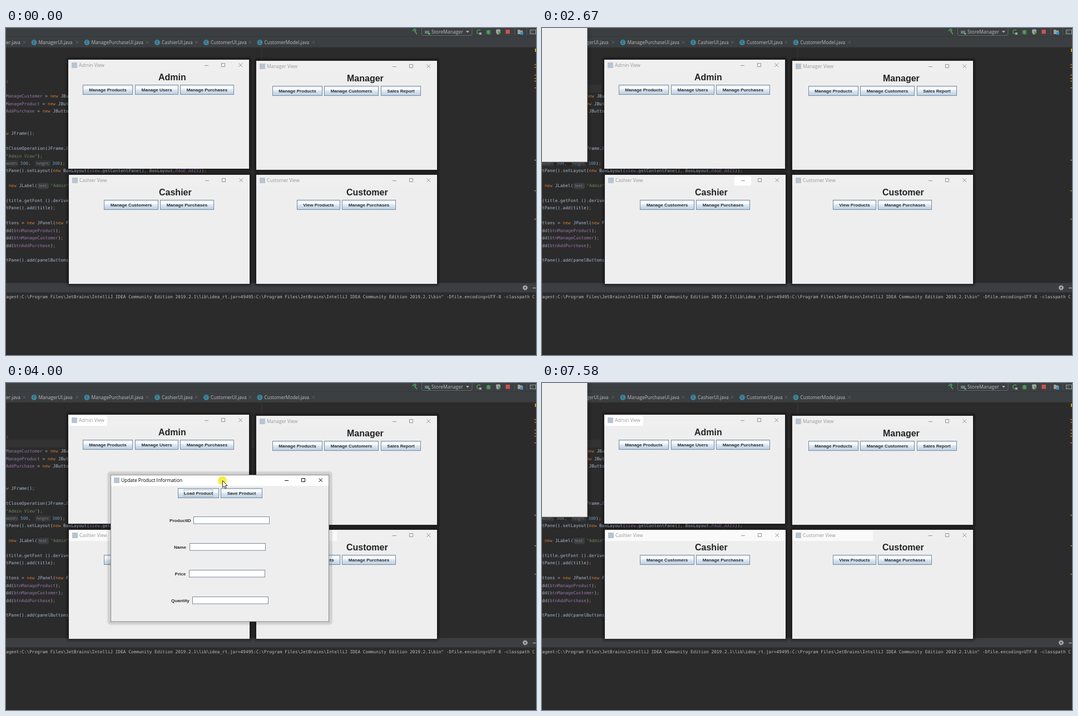
Animation, 953 px wide and 588 px high, one loop 8000 ms. Source, as an HTML page:

```html
<!DOCTYPE html>
<html lang="en">
<head>
<meta charset="utf-8">
<title>Store manager windows</title>
<style>
html, body { margin: 0; width: 100%; height: 100%; overflow: hidden; background: #2b2b2b; }
svg { display: block; width: 953px; height: 588px; }
text { white-space: pre; }
.ui { font: 8.4px "Open Sans", "Noto Sans", sans-serif; fill: #bbb; }
.code { font: 7.79px "DejaVu Sans Mono", monospace; fill: #a9b7c6; }
.hint { font: 7.4px "Open Sans", sans-serif; fill: #7e8285; }
.o { fill: #cc7832; } .p { fill: #9876aa; } .s { fill: #6a8759; } .n { fill: #6897bb; }
.i { fill: #9876aa; font-style: italic; }
.bold { font: bold 8.1px "Liberation Sans", Arial, sans-serif; fill: #2a2a2a; }
.head { font: bold 16px "Liberation Sans", Arial, sans-serif; fill: #222; }
.shadow { filter: blur(.8px); }
.title { font: 8.4px "Open Sans", "Noto Sans", sans-serif; fill: #979797; }
.ctl { fill: none; stroke: #929292; }
.active .title { fill: #000; }
.active .ctl { stroke: #000; }
.button rect { fill: url(#metal); stroke: #7a8a99; }
.button .focus, .button .glow { fill: none; stroke: none; }
.button.hover .glow { stroke: #a9c6e3; }
.button.pressed .face { fill: #b2cbe4; }
.button.focused .focus { stroke: #a3b8cc; }
.field { fill: #fff; stroke: #7a8a99; }
</style>
</head>
<body>
<svg id="stage" viewBox="0 0 953 588"></svg>
<script>
const LOOP = 8000;
const $ = id => document.getElementById(id);

const box = (x, y, w, h, fill, extra = '') =>
  `<rect x="${x}" y="${y}" width="${w}" height="${h}" fill="${fill}" ${extra}/>`;
const label = (x, y, cls, str, extra = '') =>
  `<text x="${x}" y="${y}" class="${cls}" ${extra}>${str}</text>`;
const line = (d, color, width = 1) =>
  `<path d="${d}" fill="none" stroke="${color}" stroke-width="${width}"/>`;
const patch = (id, x, y, w, h, fill) => box(x, y, w, h, fill, `id="${id}"`);

// Editor lines; {c:text} colours a span with class c.
const code = (row, str, x = 0) => label(x, 125.3 + row * 13.41, 'code',
  str.replace(/\{(\w):([^}]*)\}/g, '<tspan class="$1">$2</tspan>'));

const tab = (name, x, closeX) =>
  (x ? `<circle cx="${x - 8}" cy="26" r="4.9" fill="#3e86a0"/>` +
    label(x - 8, 28.4, 'ui', 'C', 'text-anchor="middle" style="font-size:6.5px;fill:#1f333c"') : '') +
  label(x, 29, 'ui', name) +
  line(`M${closeX - 2} 23.5l4 4m0-4l-4 4`, '#6e7072', .8);

const button = (x, y, w, str, id = '') => `
  <g class="button" id="${id}" transform="translate(${x + .5} ${y + .5})">
    <rect class="face" width="${w - 1}" height="17"/>
    <rect class="glow" x="1" y="1" width="${w - 3}" height="15"/>
    <rect class="focus" x="10.5" y="2.5" width="${w - 22}" height="12"/>
    ${label(w / 2 - .5, 11.8, 'bold', str, 'text-anchor="middle"')}
  </g>`;

const frame = (id, x, y, w, h, title, shade, pad, content, barFill = '#efefef') => `
  <g id="${id}" transform="translate(${x} ${y})">
    ${box(-pad, -pad, w + 2 * pad, h + 2 * pad, '#000', `rx="5" opacity="${shade}" class="shadow"`)}
    ${box(0, 0, w, h, '#eee')}
    ${box(0, 0, w, 20, barFill)}
    <g id="${id}Bar"></g>
    ${box(6, 5, 10, 10, '#b7c4d2')}
    ${label(19, 13.4, 'title', title)}
    <path class="ctl" d="M${w - 80} 10.5h7M${w - 49.5} 6.5h6v6h-6z"/>
    <path class="ctl" d="M${w - 18.5} 6.5l6.5 6.5m0-6.5l-6.5 6.5"/>
    ${content}
  </g>`;

const view = (id, x, y, name, headX, buttons) =>
  frame(id, x, y, 325, 196, name + ' View', .27, 4.5,
    label(headX, 37, 'head', name) +
    buttons.map(([bx, w, str, bid]) => button(bx, 45, w, str, bid)).join(''));

const input = (str, labelX, x, y) =>
  label(labelX, y + 10.3, 'bold', str) +
  box(x + .5, y + .5, 136, 12.5, '#fff', 'class="field"');

const toolbar = () =>
  box(0, 0, 953, 35, '#3c3f41') + box(0, 15, 953, 1, '#353739') + box(0, 34.5, 953, .8, '#323232') +
  line('M731 5l4-3 2 2-2 2 4 5', '#499c54', 2) +
  box(747.5, -3, 90.5, 16.5, '#3c3f41', 'stroke="#646668" rx="2"') +
  box(753, 3, 8, 7, '#6d7b83') + box(753, 3, 8, 2, '#40474c') +
  '<circle cx="761" cy="10.5" r="1.8" fill="#46c25b"/>' +
  label(765, 10, 'ui', 'StoreManager', 'style="font-size:8.6px"') +
  '<path d="M827 5h6l-3 4z" fill="#a5a7a9"/>' +
  line('M853 4.5a3.6 3.6 0 1 0 .6 4', '#499c54', 1.5) + box(851, 8, 4, 4, '#9da0a2') +
  '<ellipse cx="867.5" cy="7.5" rx="3" ry="4" fill="#499c54"/>' +
  line('M863 4l9 7M872 4l-9 7M863 7.5h9', '#499c54', .9) +
  '<path d="M881 3l4-1 4 1v4q-1 4-4 5-4-1-4-5z" fill="#9da0a2"/><path d="M885 5l5 3.5-5 3.5z" fill="#499c54"/>' +
  box(898.5, 3, 7.5, 7.5, '#c75450') +
  line('M914.5 1v12M936.5 1v12', '#515355') +
  '<path d="M920 3h4l1 1.5h4v6.5h-9z" fill="#9da0a2"/>' + box(925, 7, 5, 5, '#3592c4') +
  box(942.5, 3.5, 10, 7, '#3c3f41', 'stroke="#9da0a2"') + line('M944 5l3 2-3 2', '#499c54') +
  tab('er.java', 0, 33) + tab('ManagerUI.java', 58.5, 128) + tab('ManagePurchaseUI.java', 153.5, 254) +
  tab('CashierUI.java', 280, 342) + tab('CustomerUI.java', 368, 439) + tab('CustomerModel.java', 464.5, 553);

const editor = () =>
  box(459.5, 35, 1, 424, '#3a3a3a') +
  patch('caretA', 0, 102, 107, 14, '#323232') + patch('caretB', 441, 102, 5, 14, '#323232') +
  code(-2, '{o:;}') +
  code(0, '{p:ManageCustomer} = {o:new} JButton') +
  code(1, '{p:ManageProduct} = {o:new} JButton') +
  code(2, '{p:AddPurchase} = {o:new} JButton') +
  code(5, '{o:w} JFrame(){o:;}') +
  code(7, 'tCloseOperation(JFrame.{i:EXIT}') +
  code(8, '{s:"Admin View"}){o:;}') +
  box(-3, 238, 25, 11, '#343536', 'rx="2"') + box(52, 238, 28, 11, '#343536', 'rx="2"') +
  label(0, 245.8, 'hint', 'width:') + label(54.5, 245.8, 'hint', 'height:') +
  code(9, '{n:500}{o:,}', 26) + code(9, '{n:300}){o:;}', 83) +
  code(10, 'tPane().setLayout({o:new} BoxLayout({p:view}.getContentPane(){o:,} BoxLayout.{i:PAGE_AXIS})){o:;}') +
  code(12, ' {o:new} JLabel(') +
  box(57, 278.5, 20, 11, '#3b3d3e', 'rx="2"') + label(59, 286, 'hint', 'text:') +
  code(12, '{s:"Admin"}', 80) +
  code(14, '(title.getFont ().deriveFont') +
  code(15, 'tPane().add(title){o:;}') +
  code(17, 'ttons = {o:new} JPanel({o:new} Flow') +
  code(18, 'dd({p:btnManageProduct}){o:;}') +
  code(19, 'dd({p:btnManageCustomer}){o:;}') +
  code(20, 'dd({p:btnAddPurchase}){o:;}') +
  code(22, 'tPane().add(panelButtons') +
  box(951, 37, 2, 6, '#c9a022') +
  [65, 70, 84, 90, 95, 107, 237, 292, 343].map(y => box(950, y, 3, 1.3, '#b8912a')).join('');

const terminal = () =>
  box(0, 458.5, 953, 17, '#3c3f41') + box(0, 475, 953, .8, '#323232') +
  '<circle cx="933.5" cy="467" r="2.6" fill="none" stroke="#afb1b3" stroke-width="2"/>' +
  '<circle cx="933.5" cy="467" r="4" fill="none" stroke="#afb1b3" stroke-width="1.3" stroke-dasharray="1.6 1.54"/>' +
  line('M947 467.5h6', '#afb1b3', 1.2) +
  label(0, 486, 'code', 'agent:' + [
    'lib\\idea_rt.jar=49495:', 'bin" -Dfile.encoding=UTF-8 -classpath C'
  ].map(tail => 'C:\\Program Files\\JetBrains\\IntelliJ IDEA Community Edition 2019.2.1\\' + tail).join(''),
  'style="fill:#bbb"');

$('stage').innerHTML = `
  <defs><linearGradient id="metal" x2="0" y2="1">
    <stop stop-color="#dde8f3"/><stop offset=".3" stop-color="#fff"/>
    <stop offset=".5" stop-color="#dde8f3"/><stop offset="1" stop-color="#b8cfe5"/>
  </linearGradient></defs>
  ${box(0, 0, 953, 588, '#2b2b2b')}
  ${toolbar()}${editor()}${terminal()}
  ${view('manager', 450, 59, 'Manager', 163,
    [[29, 90, 'Manage Products'], [122, 98, 'Manage Customers'], [224, 72, 'Sales Report']])}
  ${view('customer', 450, 264, 'Customer', 162,
    [[73, 78, 'View Products'], [154, 97, 'Manage Purchases']])}
  ${view('cashier', 113, 264, 'Cashier', 162,
    [[63, 98, 'Manage Customers'], [164, 97, 'Manage Purchases']])}
  ${view('admin', 112, 57, 'Admin', 162,
    [[26, 90, 'Manage Products', 'products'], [120, 78, 'Manage Users', 'users'], [201, 97, 'Manage Purchases']])}
  ${frame('form', 0, 0, 393, 264, 'Update Product Information', .13, 5.5,
    `<g id="closeHot">${box(363, .5, 30, 20, '#e81123')}${line('M374.5 6.5l6.5 6.5m0-6.5l-6.5 6.5', '#fff')}</g>` +
    button(121, 24, 74, 'Load Product', 'load') + button(198, 24, 75, 'Save Product') +
    input('ProductID', 106, 149, 75) + input('Name', 114, 142, 123) +
    input('Price', 115.5, 141, 171) + input('Quantity', 109, 147, 219) +
    box(.5, .5, 392, 263.5, 'none', 'stroke="#6f6f6f" stroke-width=".8"'), '#fff')}
  <g id="cursor">
    <circle id="halo" r="8" fill="#f5ea2c" opacity=".85"/>
    <path d="M.5 0V12.3L3.2 9.8 5.2 14.4 7.2 13.5 5.3 9.1H9Z" fill="#fff" stroke="#111" stroke-width=".9"/>
  </g>`;

$('adminBar').innerHTML = patch('adminWhite', 0, 0, 70, 20, '#fff');
$('cashierBar').innerHTML = patch('cashierWhite', 0, 0, 325, 20, '#fafafa') +
  patch('minWhite', 233, 3, 30, 16, '#fff');
$('customerBar').innerHTML = patch('customerWhite', 0, 0, 145, 20, '#fafafa');
$('form').classList.add('active');
$('load').classList.add('focused');

// [time, x, y]; a bare time hides the part.
const cursorSteps = [
  [0], [160, 612, 449], [300, 510, 388], [590, 370, 276], [730, 257, 189],
  [1020, 245, 174], [1140, 226, 148], [1260, 208, 124], [1380, 198, 109], [1490, 194.5, 104.5],
  [2020, 184, 96], [2160, 142, 68], [2300, 88, 36], [2450, 34, 10], [2670],
  [3300, 80, 52], [3440, 238, 119.5], [3520, 300, 138], [3650, 345, 153], [3820, 369, 163],
  [4000, 389, 175.5], [4400, 402, 180], [4530, 430, 183], [4650, 470, 183], [4780, 512, 181],
  [4900, 542, 178], [5050, 562, 178], [5190, 566.5, 179],
  [6400, 470, 150], [6500, 340, 116], [6580, 286, 104.5], [7460, 227, 109], [7580]
];
const formSteps = [
  [0], [1900, -311, -23], [3300, -120, 43], [3440, 37, 109], [3520, 100, 128], [3650, 145, 143],
  [3820, 168, 153], [4000, 188, 165], [6030], [7040, -311, -23]
];

const within = (t, ...spans) => spans.some(([from, to]) => t >= from && t < to);
const show = (id, on) => { $(id).style.display = on ? '' : 'none'; };
const mark = (id, cls, on) => $(id).classList.toggle(cls, on);
function place(id, steps, t) {
  const [, x, y] = steps.findLast(step => step[0] <= t);
  show(id, x !== undefined);
  if (x !== undefined) $(id).setAttribute('transform', `translate(${x} ${y})`);
}

function render(t) {
  place('cursor', cursorSteps, t);
  place('form', formSteps, t);
  show('halo', within(t, [1780, 1900], [3300, 4190], [6920, 7040]));
  mark('admin', 'active', within(t, [1780, 1900], [6030, 7040]));
  mark('products', 'hover', within(t, [1380, 1780]));
  mark('products', 'pressed', within(t, [1780, 1900]));
  mark('products', 'focused', within(t, [6030, 6920]));
  mark('users', 'hover', within(t, [6580, 6920]));
  mark('users', 'pressed', within(t, [6920, 7040]));
  show('closeHot', within(t, [5050, 6030]));
  show('minWhite', within(t, [590, 3440]));
  show('adminWhite', t >= 3300);
  show('cashierWhite', t >= 3440);
  show('customerWhite', t >= 4000);
  show('caretA', t >= 1900);
  show('caretB', t >= 3300);
}

const start = performance.now();
function tick() {
  render((performance.now() - start) % LOOP);
  requestAnimationFrame(tick);
}
tick();
</script>
</body>
</html>
```
